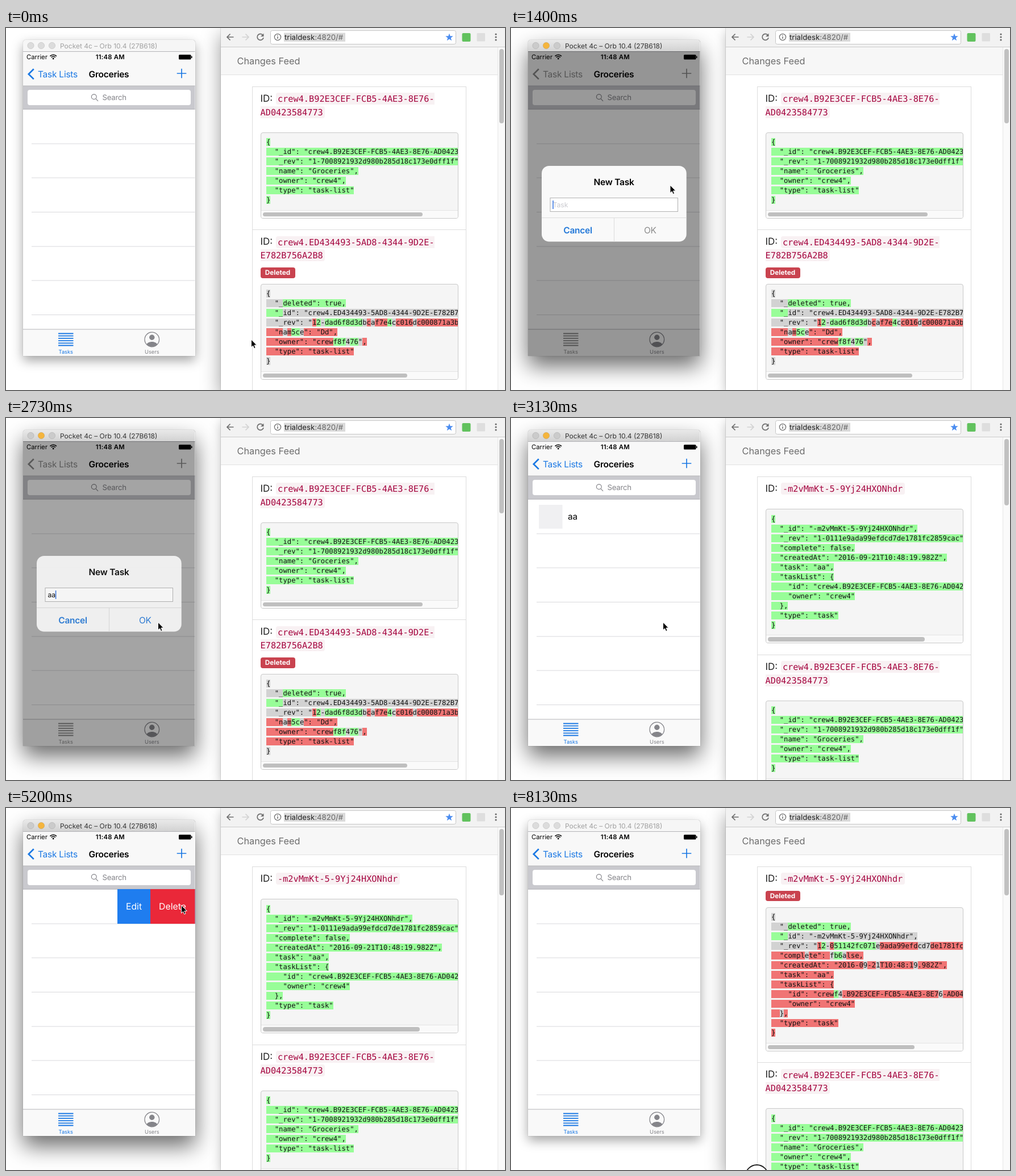
Write an HTML page that moves like this. It is 878x638 px and loops after 8190 ms.

```html
<!DOCTYPE html>
<html lang="en">
<head>
<meta charset="utf-8">
<title>Task list and changes feed</title>
<style>
  html, body { margin: 0; width: 100%; height: 100%; overflow: hidden; background: #fff; }
  body { position: relative; font-family: Inter, Roboto, sans-serif; text-rendering: geometricPrecision; }
  svg, #win, #page, .feed, .feed div { position: absolute; box-sizing: border-box; }
  svg { left: 0; top: 0; width: 878px; height: 638px; }
  text { white-space: pre; }

  #win { left: 30px; top: 21px; width: 302.5px; height: 557px; border-radius: 5px 5px 0 0;
    box-shadow: 0 0 1px rgba(0,0,0,.5), 0 8px 20px rgba(0,0,0,.36); }
  #win.on { box-shadow: 0 0 1px rgba(0,0,0,.6), 0 18px 38px rgba(0,0,0,.58); }
  #page { left: 378px; top: 0; width: 500px; height: 638px; background: #fff;
    box-shadow: 0 0 1px rgba(0,0,0,.6), 0 12px 32px rgba(0,0,0,.4); }
  #page.off { box-shadow: 0 0 1px rgba(0,0,0,.6), 0 6px 18px rgba(0,0,0,.25); }

  .nav { font-size: 15.5px; letter-spacing: -.25px; }
  .bold { font-weight: 600; }
  .mid { text-anchor: middle; }
  .small { font-size: 11.3px; }
  .tab { font-size: 9.3px; text-anchor: middle; }
  .tint { fill: var(--tint); }
  .line { stroke: var(--tint); fill: none; }

  .feed { left: 433px; top: 102.5px; width: 376.5px; height: 700px; }
  .feed .card { left: 0; width: 100%; border: 1px solid #dcdcdc; background: #fff; }
  .feed .id { left: 13.5px; top: 10px; font-size: 17px; line-height: 23.6px; color: #222; white-space: nowrap; }
  .id b { display: inline-block; width: 27px; font-weight: 400; }
  .id code { font: 15.28px "DejaVu Sans Mono", monospace; line-height: 0; color: #a5053f;
    background: #f8f1f3; padding: 1.5px 3.4px; border-radius: 4px; }
  .feed .badge { left: 13.5px; width: 61px; height: 18.5px; border-radius: 4px; background: #c9434f;
    color: #fff; font: bold 11.8px/18.5px Inter, sans-serif; text-align: center; }
  .feed .pre { left: 13.5px; width: 348px; overflow: hidden; border: 1px solid #c9c9c9; border-radius: 4px;
    background: #f5f5f5; padding: 8.5px 9.5px; color: #111; white-space: pre;
    font: 12.22px/17px "DejaVu Sans Mono", monospace; }
  .feed .pre p { margin: 0; height: 17px; }
  .feed .rail { left: 0; right: 0; bottom: 0; height: 14px; border-top: 1px solid #e4e4e4; background: #fafafa; }
  .feed .thumb { left: 3px; top: 3px; height: 7.5px; border-radius: 4px; background: #bfbfbf; }
  .same { background: #d2d2d2; }
  .add { background: #98fd98; }
  .cut { background: #f07474; }
</style>
</head>
<body>
<div id="win"></div>

<svg id="phone" viewBox="0 0 878 638">
  <defs>
    <linearGradient id="bar" x2="0" y2="1"><stop stop-color="#e9e9e9"/><stop offset="1" stop-color="#d2d2d2"/></linearGradient>
    <clipPath id="screen"><path d="M30 41H332.5V578H30Z"/></clipPath>
    <clipPath id="rowClip"><rect id="rowBox" x="30" y="143" width="303"/></clipPath>
  </defs>
  <path id="title" d="M30 41V26a5 5 0 0 1 5-5H327.5a5 5 0 0 1 5 5V41Z"/>
  <g id="lights" stroke="#000" stroke-opacity=".1">
    <circle cx="43.5" cy="31" r="5.7"/><circle id="mini" cx="62" cy="31" r="5.7"/><circle cx="81" cy="31" r="5.7"/>
  </g>
  <text id="caption" x="95" y="35.5" font-size="12">Pocket 4c – Orb 10.4 (27B618)</text>

  <g clip-path="url(#screen)">
    <path fill="#fff" d="M30 41H333V578H30Z"/>
    <path fill="#f8f8f8" d="M30 41H333V102H30Z"/>
    <path fill="#c9c9ce" d="M30 102H333V143.5H30Z"/>
    <path stroke="#b4b4b8" d="M30 41.5H333M30 102H333M30 143H333"/>
    <text class="small" x="36" y="55">Carrier</text>
    <g fill="none" stroke="#000" stroke-width="1.6">
      <path d="M77.5 49.6a8 8 0 0 1 11.4 0M79.6 51.8a5 5 0 0 1 7.2 0"/><circle cx="83.2" cy="54" r=".6"/>
    </g>
    <text class="small bold mid" x="183.3" y="55" letter-spacing=".2">11:48 AM</text>
    <rect x="304" y="47" width="21.5" height="8.5" rx="1.6"/><rect x="326" y="49.5" width="1.5" height="3.5"/>
    <path class="line" stroke-width="2.7" d="M48.8 72.3 39.8 81.2l9 8.9"/>
    <text class="nav tint" x="56" y="87">Task Lists</text>
    <text class="nav bold mid" x="181" y="87">Groceries</text>
    <path class="line" stroke-width="1.7" d="M300.7 80h16.6M309 71.7v16.6"/>
    <rect x="38" y="109" width="287" height="27" rx="4" fill="#fff"/>
    <g fill="none" stroke="#85858a" stroke-width="1.2"><circle cx="154.8" cy="121.3" r="4.4"/><path d="m158 124.6 4 4.2"/></g>
    <text x="169.5" y="127" font-size="13.2" letter-spacing="-.25" fill="#85858a">Search</text>

    <path stroke="#d9d9dc" d="M45 204H333M45 264H333M45 324.5H333M45 385H333M45 445H333M45 505.5H333"/>
    <g id="row">
      <rect x="49" y="153" width="41.5" height="42" fill="#f0f0f2"/>
      <text x="100" y="179" font-size="15.2">aa</text>
    </g>
    <g id="actions" clip-path="url(#rowClip)" font-size="15.8">
      <g id="edit"><path fill="#1f7def" d="M0 143H140V204H0Z"/><text class="mid" x="29" y="179.3" fill="#fff">Edit</text></g>
      <g id="del"><path fill="#ea2839" d="M0 143H140V204H0Z"/><text class="mid" x="39" y="179.3" fill="#fff">Delete</text></g>
    </g>

    <path fill="#f9f9f9" d="M30 531H333V578H30Z"/>
    <path stroke="#b4b4b8" d="M30 531H333"/>
    <path class="line" stroke-width="1.8" d="M92 538.5h26.5m-26.5 4.2h26.5m-26.5 4.2h26.5m-26.5 4.2h26.5m-26.5 4.2h26.5m-26.5 4.2h26.5"/>
    <text class="tab tint" x="105.3" y="574">Tasks</text>
    <g fill="#85858a">
      <circle cx="256.8" cy="549" r="12.8" fill="none" stroke="#85858a" stroke-width="1.3"/>
      <circle cx="256.8" cy="545.2" r="4.7"/><path d="M247.5 557.5c2.5-6 16-6 18.6 0a12.8 12.8 0 0 1-18.6 0Z"/>
      <text class="tab" x="256.8" y="574">Users</text>
    </g>
    <path id="dim" d="M30 41H333V578H30Z"/>
  </g>

  <g id="dialog">
    <rect x="54" y="243" width="254.7" height="133.5" rx="13" fill="#f9f9f9"/>
    <path id="press" fill="#e7e8e6" d="M181.5 334.5H308.7V363.5a13 13 0 0 1-13 13H181.5Z"/>
    <text class="nav bold mid" x="181" y="277">New Task</text>
    <rect x="69" y="299.5" width="224.5" height="24" fill="#fff" stroke="#b2b2b2"/>
    <text id="entry" x="73.5" y="316" font-size="12.2"></text>
    <path id="caret" stroke="#2f6fe0" stroke-width="1.5" d="M0 304V319"/>
    <path stroke="#dcdcdc" d="M54 334.5H308.7M181.5 334.5V376.5"/>
    <text class="nav bold mid" x="117.5" y="361.5" fill="#1f76d8">Cancel</text>
    <text id="ok" class="nav mid" x="244.8" y="361.5">OK</text>
  </g>
</svg>

<div id="page"></div>
<div id="feeds"></div>

<svg viewBox="0 0 878 638">
  <path fill="#f2f2f2" d="M378 0H878V33.5H378Z"/>
  <path fill="#f7f7f7" d="M378 34H865V82H378Z"/>
  <path stroke="#cbcbcb" d="M378 33.5H878"/>
  <path stroke="#e3e3e3" d="M378 82.5H865"/>
  <path fill="#fafafa" d="M865 34H878V638H865Z"/>
  <path stroke="#e6e6e6" d="M865.5 34V638"/>
  <rect id="scroll" x="868" y="37" width="8" rx="4" fill="#c1c1c1"/>
  <rect x="465.5" y="4.5" width="326" height="24" rx="3" fill="#fff" stroke="#c6c6c6"/>
  <g fill="none" stroke="#6e6e6e" stroke-width="1.7">
    <path d="M400.5 16H389.5M394.5 10.5 389 16l5.5 5.5"/>
    <path stroke="#d2d2d2" d="M415.5 16H426.5M421.5 10.5 427 16l-5.5 5.5"/>
    <path d="M452 12.5a5.5 5.5 0 1 0 1 4.5"/>
    <circle cx="478" cy="16" r="5.6" stroke-width="1.3"/><path stroke-width="1.5" d="M478 15v4M478 12.3v1.5"/>
  </g>
  <path fill="#6e6e6e" d="M453.5 9.5v5.5h-5.5Z"/>
  <rect x="489" y="8.5" width="108" height="15.5" fill="#dadada"/>
  <text x="490" y="21" font-size="13.2" fill="#222">trialdesk<tspan fill="#666">:4820/#</tspan></text>
  <path fill="#4a8cf0" transform="translate(780 16.5)" d="M0-7 1.7-2.3 6.7-2.2 2.8.9 4.1 5.7 0 2.9-4.1 5.7-2.8.9-6.7-2.2-1.7-2.3Z"/>
  <rect x="802.5" y="9" width="15" height="15" rx="2" fill="#62c25e"/>
  <rect x="828.5" y="9" width="14.5" height="14.5" rx="1" fill="#dedede"/>
  <g fill="#666"><circle cx="862" cy="11" r="1.6"/><circle cx="862" cy="16" r="1.6"/><circle cx="862" cy="21" r="1.6"/></g>
  <text x="406.5" y="64" font-size="16.3" fill="#6c6c6c">Changes Feed</text>
  <circle id="ring" cx="432.5" cy="649" r="20" fill="#fff" stroke="#222" stroke-width="1.8"/>
  <path id="cursor" stroke="#fff" d="M0 0V13.8L3.1 10.9 5.2 15.7 7.5 14.7 5.5 10H9.8Z"/>
</svg>

<script>
const LOOP = 8190;
const $ = id => document.getElementById(id);

// Line markup: | unchanged, ^ added, ~ removed.
const KINDS = { '|': 'same', '^': 'add', '~': 'cut' };

const groceries = {
  id: ['crew4.B92E3CEF-FCB5-4AE3-8E76-', 'AD0423584773'], thumb: 281,
  lines: ['^{', '^  "_id": "crew4.B92E3CEF-FCB5-4AE3-8E76-AD0423584773",',
    '^  "_rev": "1-7008921932d980b285d18c173e0dff1f",', '^  "name": "Groceries",',
    '^  "owner": "crew4",', '^  "type": "task-list"', '^}']
};
const oldList = {
  id: ['crew4.ED434493-5AD8-4344-9D2E-', 'E782B756A2B8'], thumb: 254, deleted: true,
  lines: ['|{', '|  "_^deleted": true,', '^  "_|id": "crew4.ED434493-5AD8-4344-9D2E-E782B756A2B8",',
    '|  "_rev": "~1^2|-^dad6f8d3d|b~c|a~f7e^4|c~c016|d~c000871a3b90',
    '~  "n|a~m^5c|e~": "Dd",', '~  "owner": "crew^f8f|4^76|"~,', '~  "type": "task-list"', '|}']
};
const newTask = {
  id: ['-m2vMmKt-5-9Yj24HXONhdr'], thumb: 276,
  lines: ['^{', '^  "_id": "-m2vMmKt-5-9Yj24HXONhdr",', '^  "_rev": "1-0111e9ada99efdcd7de1781fc2859cac",',
    '^  "complete": false,', '^  "createdAt": "2016-09-21T10:48:19.982Z",', '^  "task": "aa",',
    '^  "taskList": {', '^    "id": "crew4.B92E3CEF-FCB5-4AE3-8E76-AD0423584773",',
    '^    "owner": "crew4"', '^  },', '^  "type": "task"', '^}']
};
const goneTask = {
  id: newTask.id, thumb: 258, deleted: true,
  lines: ['|{', '|  "_^deleted": true,', '^  "_|id": "-m2vMmKt-5-9Yj24HXONhdr",',
    '|  "_rev": "~1^2|-~0^51142fc071|e~9ada99efd|cd7~de1781fc2859',
    '~  "compl|e~te": |f^b6|a~lse,', '~  "createdAt": "2016-0|9~-2|1~T10:48:1|9~.982Z",',
    '~  "task": "aa",', '~  "taskList": {', '~    "id": "crew^f|4~.B92E3CEF-FCB5-4AE3-8E7|6~-AD0423584773',
    '~    "owner": "crew4"', '~  |}~,', '~  "type": "task"', '~}']
};

const lineHtml = line => '<p>' + line.split(/(?=[|^~])/)
  .map(part => `<span class="${KINDS[part[0]]}">${part.slice(1)}</span>`).join('') + '</p>';

function feedHtml(cards) {
  let top = 0;
  return '<div class="feed">' + cards.map(({ id, thumb, deleted, lines }) => {
    const extra = 23.6 * (id.length - 1);
    const preTop = 57.5 + extra + (deleted ? 14.5 : 0);
    const preHeight = lines.length * 17 + 33;
    const height = preTop + preHeight + 19.7;
    const html = `<div class="card" style="top:${top}px;height:${height + 1}px">
      <div class="id"><b>ID:</b><code>${id.join('<br>')}</code></div>
      ${deleted ? `<div class="badge" style="top:${42.3 + extra}px">Deleted</div>` : ''}
      <div class="pre" style="top:${preTop - 1}px;height:${preHeight}px">${lines.map(lineHtml).join('')}
        <div class="rail"><div class="thumb" style="width:${thumb}px"></div></div></div></div>`;
    top += height;
    return html;
  }).join('') + '</div>';
}

$('feeds').innerHTML = [[groceries, oldList], [newTask, groceries], [goneTask, groceries]].map(feedHtml).join('');
const feeds = [...$('feeds').children];

// Pointer stops: time, x, y.
const PATH = [
  [0, 431.5, 549], [90, 431.5, 549], [740, 309, 79], [1000, 309, 79], [1350, 280, 277], [2130, 280, 277],
  [2470, 267.5, 360], [3580, 267.5, 360], [4250, 285, 175], [4420, 285, 175], [4800, 150, 175],
  [5130, 308.5, 171.5], [5800, 308.5, 171.5], [6400, 516.5, 219.5], [6980, 516.5, 219.5],
  [7350, 485, 320], [8080, 432, 649], [LOOP, 432, 649]
];

const ramp = (t, a, b) => {
  const k = Math.min(1, Math.max(0, (t - a) / (b - a)));
  return k * k * (3 - 2 * k);
};
const within = (t, a, b) => t >= a && t < b;
const show = (id, on) => { $(id).style.display = on ? '' : 'none'; };
const set = (id, attrs) => { for (const k in attrs) $(id).setAttribute(k, attrs[k]); };

function pointer(t) {
  const i = Math.max(1, PATH.findIndex(p => p[0] > t));
  const [a, b] = [PATH[i - 1], PATH[i]];
  const k = ramp(t, a[0], b[0]);
  return [a[1] + (b[1] - a[1]) * k, a[2] + (b[2] - a[2]) * k];
}

function drawWindow(t) {
  const active = within(t, 800, 7300);
  $('win').className = active ? 'on' : '';
  $('page').className = active ? 'off' : '';
  set('title', { fill: active ? 'url(#bar)' : '#f6f6f6' });
  set('lights', { fill: active ? '#cbcbcb' : '#dcdcdc' });
  set('mini', { fill: active ? '#f5b53d' : '#dcdcdc' });
  set('caption', { fill: active ? '#333' : '#a0a0a0' });
}

function drawDialog(t) {
  const enter = ramp(t, 940, 1200), leave = ramp(t, 2690, 2890);
  const open = enter * (1 - leave);
  const scale = 1.2 - 0.2 * enter;
  const typed = t < 1860 ? '' : t < 2000 ? 'a' : 'aa';
  $('phone').style.setProperty('--tint', within(t, 940, 2790) ? '#8a8a8a' : '#1a78e4');
  set('dim', { 'fill-opacity': 0.4 * open });
  set('dialog', { opacity: open, transform: `translate(181.3 310) scale(${scale}) translate(-181.3 -310)` });
  $('entry').textContent = typed || 'Task';
  set('entry', { fill: typed ? '#000' : '#c9c9ce' });
  set('caret', { transform: `translate(${74 + typed.length * 6.8} 0)` });
  set('ok', { fill: typed ? '#1f76d8' : '#8c8c8c' });
  show('press', within(t, 2530, 2720));
}

function drawRow(t) {
  const slide = 136.5 * ramp(t, 4420, 4830);
  const close = ramp(t, 5300, 5600);
  show('row', within(t, 2860, 5300));
  set('row', { opacity: ramp(t, 2860, 3050), transform: `translate(${-slide} 0)` });
  show('actions', slide > 0 && close < 1);
  set('rowBox', { height: 61 * (1 - close) });
  set('edit', { transform: `translate(${332.5 - slide} 0)` });
  set('del', { transform: `translate(${332.5 - slide * 0.575} 0)` });
}

function drawFeed(t) {
  const stage = t < 2980 ? 0 : t < 5680 ? 1 : 2;
  feeds.forEach((feed, i) => { feed.style.display = i === stage ? '' : 'none'; });
  set('scroll', { height: stage ? 117 : 131 });
}

const start = performance.now();
function frame() {
  const t = (performance.now() - start) % LOOP;
  drawWindow(t);
  drawDialog(t);
  drawRow(t);
  drawFeed(t);
  const [x, y] = pointer(t);
  set('cursor', { transform: `translate(${x} ${y})` });
  show('ring', t >= 8050);
  requestAnimationFrame(frame);
}
frame();
</script>
</body>
</html>
```
